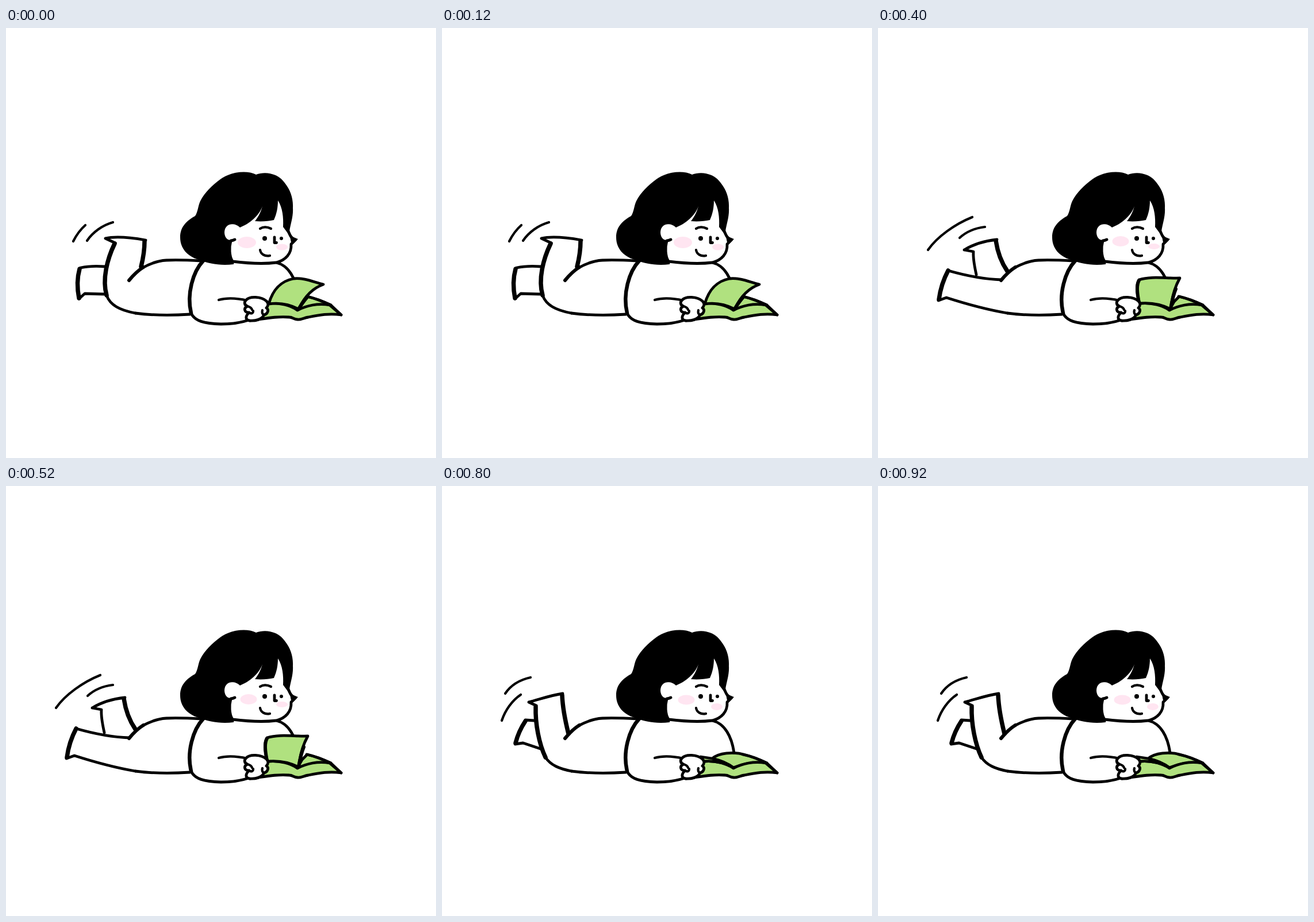
Animation of 748x748 px, one loop 1 s. Source, as an HTML page:

```html
<!DOCTYPE html>
<html lang="en">
<head>
<meta charset="utf-8">
<title>Reading on the floor</title>
<style>
  html, body { margin: 0; height: 100%; overflow: hidden; background: #fff; }
  svg { display: block; width: 100%; height: 100%; }
  path { fill: none; stroke: #000; stroke-width: 4.8; stroke-linecap: round; stroke-linejoin: round; }
  .bold { stroke-width: 7.5; }
  .thin { stroke-width: 4.2; }
  .skin { fill: #fff; }
  .ink { fill: #000; stroke: none; }
  .paper { fill: #b0e17f; }
  ellipse { fill: #ffe5f1; }
</style>
</head>
<body>
<svg viewBox="0 0 748 748">
  <path id="swish" class="thin"/>
  <path id="leg"/>
  <path id="legBold" class="bold"/>

  <!-- body and shirt -->
  <path class="bold" style="stroke-width:6" d="M214 439C223 428 231 421 239 416"/>
  <path d="M236 418C248 411 262 405 279 404C300 403 320 404 340 405"/>
  <path d="M225 496C255 500 290 500 320 498"/>
  <path class="bold" style="stroke-width:6.5" d="M343 405C325 424 314 463 322 496"/>
  <path d="M322 496C328 510 345 514 374 515C392 515 408 513 422 508"/>
  <path class="thin" d="M370 473C384 469 402 470 420 474"/>
  <path d="M470 408C492 413 504 436 508 464"/>

  <!-- book -->
  <path id="back" class="paper"/>
  <path class="paper" d="M455 479C476 477 496 483 507 491C522 483 543 478 563 482L583 499C563 496 545 499 526 503C518 504 514 508 507 507C500 507 499 503 493 503C470 501 448 506 424 509Z"/>
  <path d="M523 467C538 470 553 476 565 482L583 499"/>
  <path id="page" class="paper"/>
  <path id="pageBold" style="stroke-width:6"/>

  <!-- hand -->
  <path class="skin" d="M418 473C424 466 444 467 453 475C457 479 456 484 453 487C458 490 455 498 449 499C445 507 434 510 424 509C416 508 416 501 423 495C414 495 413 487 420 484C414 482 414 476 418 473Z"/>
  <path class="thin" d="M420 484C424 485 427 487 428 490M423 495C427 498 430 496 430 492M449 499C446 498 445 495 446 491"/>

  <g id="head">
    <path class="ink" d="M396 411C373 414 353 410 335 403C315 397 303 383 303 364C303 345 315 335 329 327C334 320 334 309 338 301C345 287 359 273 373 263C391 250 419 247 435 255C453 248 475 254 486 271C494 281 500 296 499 313C500 328 495 340 493 354L489 360L400 380Z"/>
    <path class="skin" style="stroke:none" d="M407 347C424 340 440 327 446 310C443 322 437 331 433 336C445 337 457 336 466 334C471 323 473 312 473 300C481 312 483 330 482 346L491 358C494 363 498 367 504 368L496 375C497 393 486 404 470 408C446 411 418 409 394 406C387 397 388 381 391 369C384 369 380 363 380 355C381 339 398 338 407 347Z"/>
    <path d="M485 343C490 349 491 354 494 360C496 365 500 367 504 368L496 376C497 393 486 404 470 408C446 411 418 409 394 406C388 397 388 381 391 370C394 370 396 369 398 368"/>
    <path class="ink" d="M494 363L508 367L497 378Z"/>
    <ellipse id="cheekL"/>
    <ellipse id="cheekR"/>
    <circle cx="450" cy="366" r="4"/>
    <circle cx="479" cy="366" r="3"/>
    <path class="thin" d="M442 349C448 345 455 346 461 349M442 386C443 393 450 398 459 396"/>
    <path d="M467 364V373.5H470.5"/>
  </g>
</svg>
<script>
const el = id => document.getElementById(id);
const draw = (id, d) => el(id).setAttribute('d', d);

// Leg poses: outline, heavy strokes, motion marks
const raised = {
  leg: 'M173 366C190 362 220 365 243 369M173 366L190 374M175 465C181 482 198 491 225 496M172 415C158 414 144 414 130 417M127 471L137 462L172 463',
  bold: 'M241 371C241 388 238 403 235 415M128 419C123 437 124 455 127 470M189 375C176 402 167 437 175 465',
  swish: 'M138 343C130 350 123 359 117 371M186 338C168 343 151 355 141 370'
};
const middle = {
  leg: 'M136 386C155 379 173 374 192 367M136 386L150 391M179 473C189 486 205 492 225 496M125 441L137 439L158 448M146 405L156 445',
  bold: 'M191 369C199 390 208 413 217 432M144 404C135 413 128 427 126 440M150 391C150 417 161 451 179 473',
  swish: 'M119 341C136 327 158 318 180 315M109 381C123 364 138 353 155 349'
};
const lowered = {
  leg: 'M122 422C150 430 184 437 215 438M105 474L119 469C150 479 190 490 225 496M150 386C168 375 188 370 207 368M150 386L166 389C165 402 168 415 171 429',
  bold: 'M122 422C114 437 108 457 106 472M205 370C208 390 216 410 225 423',
  swish: 'M87 386C103 363 134 341 164 329M142 365C154 354 169 348 186 346'
};
const rising = {
  leg: 'M151 376C170 371 189 364 210 361M151 376L164 382M180 472C189 486 205 492 225 496M160 408L145 407M127 449L141 447L171 457',
  bold: 'M209 364C210 388 215 411 220 431M145 409C137 421 131 435 128 447M163 384C162 414 169 449 180 472',
  swish: 'M110 361C120 346 136 337 154 333M137 363C122 373 110 390 104 408'
};

// Page poses: far leaf, turning leaf, its heavy edge
const lifted = {
  back: 'M515 476L524 467C540 471 554 477 565 482L507 490Z',
  page: 'M457 480C465 452 480 440 500 436C520 434 535 442 552 446C532 453 518 470 509 489C496 482 478 477 457 480Z',
  edge: 'M525 467C518 475 513 482 509 489'
};
const upright = {
  back: lifted.back,
  page: 'M455 479C450 462 449 446 454 438C476 431 502 436 525 435C515 453 511 471 509 489C496 482 478 477 455 479Z',
  edge: 'M518 454C513 466 511 478 509 488M454 478C451 462 449 448 454 439'
};
const falling = {
  back: 'M490 463C518 460 546 470 565 482C541 479 521 484 507 490Z',
  page: 'M417 458C436 452 455 451 472 455C485 463 495 475 502 488C488 481 470 477 455 479L429 468Z',
  edge: 'M472 456C485 464 495 475 501 486'
};
const flat = {
  back: 'M470 474C482 464 506 462 525 467C541 471 555 477 565 482C541 479 521 484 507 490C497 482 484 477 470 474Z',
  page: 'M450 471L470 474C484 477 497 483 507 490C492 482 474 477 455 479Z',
  edge: ''
};

// Cheeks: cx, cy, rx, ry in stage coordinates
const steps = [
  { legs: raised, book: lifted, cheeks: [[419, 373, 16, 10], [480, 381, 10, 5.5]] },
  { legs: middle, book: lifted, nod: true, cheeks: [[417, 376, 13.5, 7.5], [472, 388, 8.5, 4.5]] },
  { legs: lowered, book: upright, cheeks: [[422, 371, 14.5, 9], [480, 380, 10, 5]] },
  { legs: middle, book: falling, nod: true, cheeks: [[415, 377, 15.5, 10], [471, 390, 10, 6.5]] },
  { legs: rising, book: flat, cheeks: [[425, 372, 14.5, 8.5], [478, 384, 10, 6]] }
];
const NOD = 'translate(-3 -3) rotate(5.4 380 355)';
const UNNOD = 'rotate(-5.4 380 355) translate(3 3)';
const STEP = 200;
let shown = -1;

function show({ legs, book, nod, cheeks }) {
  draw('leg', legs.leg);
  draw('legBold', legs.bold);
  draw('swish', legs.swish);
  draw('back', book.back);
  draw('page', book.page);
  draw('pageBold', book.edge);
  el('head').setAttribute('transform', nod ? NOD : '');
  ['cheekL', 'cheekR'].forEach((id, i) => {
    ['cx', 'cy', 'rx', 'ry'].forEach((key, k) => el(id).setAttribute(key, cheeks[i][k]));
    el(id).setAttribute('transform', nod ? UNNOD : '');
  });
}

function tick() {
  const now = Math.floor(performance.now() / STEP) % steps.length;
  if (now !== shown) show(steps[shown = now]);
  requestAnimationFrame(tick);
}
tick();
</script>
</body>
</html>
```
